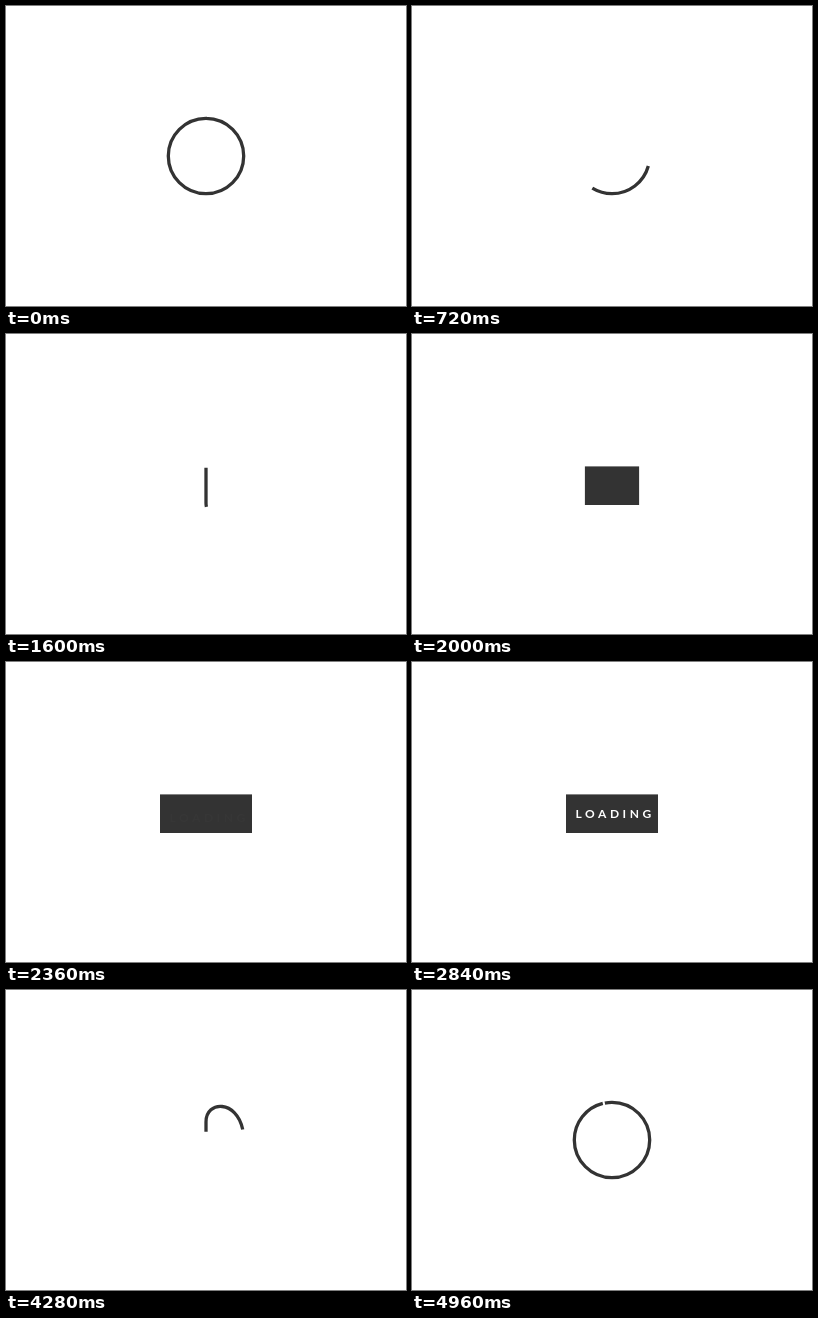
Write an HTML page that moves like this. It is 400 px wide and 300 px high and loops after 5000 ms.

```html
<!DOCTYPE html>
<html lang="en">
<head>
<meta charset="utf-8">
<title>Loading</title>
<style>
  html, body { margin: 0; width: 100%; height: 100%; overflow: hidden; background: #fff; }
  svg { display: block; width: 400px; height: 300px; }
  path { fill: none; stroke: #333; stroke-width: 3.3; }
  rect { fill: #333; }
  text { fill: #fff; font: 700 12px Lato, sans-serif; letter-spacing: 3.6px; }
</style>
</head>
<body>
<svg viewBox="0 0 400 300">
  <path id="enter"/>
  <path id="leave"/>
  <rect id="box" y="132.4" height="38.6"/>
  <text id="label" x="163.4">LOADING</text>
</svg>
<script>
const LOOP = 5000, R = 37.7, DEG = R * Math.PI / 180;
const TOP = 132.4, BOTTOM = 171, LINE = BOTTOM - TOP, STROKE = 3.3;
const [enter, leave, box, label] =
  ['enter', 'leave', 'box', 'label'].map(id => document.getElementById(id));

// Clockwise arcs, relative to the current point.
const arc = (dx, dy) => `a${R} ${R} 0 0 1 ${dx} ${dy}`;
const turn = arc(-2 * R, 0) + arc(2 * R, 0);
const right = 200 + R;

// Circle from the top, off the right side, down and up into the upright line.
enter.setAttribute('d', `M200 ${150 - R}` + arc(R, R) + turn + turn +
  `C${right} 190 200 191 200 169V${TOP}`);
// Up out of the line, over to the right side, then round the circle to the top.
leave.setAttribute('d', `M200 ${BOTTOM}V132C200 108 ${right} 110 ${right} 150` +
  turn + arc(-2 * R, 0) + arc(R, -R));

const end = enter.getTotalLength();
const join = leave.getTotalLength() - 630 * DEG;

// Smooth monotone curve through [time, value] points.
function track(...keys) {
  const secant = i => (keys[i + 1][1] - keys[i][1]) / (keys[i + 1][0] - keys[i][0]);
  const slopes = keys.map((_, i) => {
    if (i === 0 || i === keys.length - 1) return 0;
    const a = secant(i - 1), b = secant(i);
    return a * b > 0 ? 2 * a * b / (a + b) : 0;
  });
  return t => {
    if (t <= keys[0][0]) return keys[0][1];
    const i = keys.findIndex(k => k[0] > t) - 1;
    if (i < 0) return keys[keys.length - 1][1];
    const [t0, v0] = keys[i], [t1, v1] = keys[i + 1];
    const d = t1 - t0, u = (t - t0) / d, w = 1 - u;
    return v0 * w * w * (1 + 2 * u) + v1 * u * u * (3 - 2 * u) +
      d * u * w * (slopes[i] * w - slopes[i + 1] * u);
  };
}

const enterTail = track([120, 0], [720, 464 * DEG], [1200, 783 * DEG],
  [1600, end - LINE - 3], [1760, end - LINE]);
const enterHead = track([120, 361 * DEG], [720, 570 * DEG], [1200, 874 * DEG],
  [1600, end - 2.6], [1760, end]);
const leaveTail = track([4050, 0], [4280, 29], [4800, join + 218 * DEG],
  [4960, join + 258 * DEG], [5000, join + 270 * DEG]);
const leaveHead = track([4050, LINE], [4280, join - 11], [4800, join + 567 * DEG],
  [4960, join + 614 * DEG], [5000, join + 630 * DEG]);
const width = track([1765, STROKE], [2000, 54], [2200, 96], [2340, 92],
  [3700, 92], [3800, 94.5], [4050, STROKE]);
const fade = track([2330, 0], [2840, 1], [3690, 1], [3850, 0]);
const rise = track([2330, 4], [2780, 0]);

function show(el, visible) {
  el.style.display = visible ? '' : 'none';
}

function trim(path, tail, head) {
  path.style.strokeDasharray = `0 ${tail} ${head - tail} 9999`;
}

function draw(t) {
  show(enter, t < 1765);
  show(box, t >= 1765 && t < 4050);
  show(leave, t >= 4050);
  trim(enter, enterTail(t), enterHead(t));
  trim(leave, leaveTail(t), leaveHead(t));
  const w = width(t);
  box.setAttribute('x', 200 - w / 2);
  box.setAttribute('width', w);
  label.setAttribute('y', 155.7 + rise(t));
  label.style.opacity = fade(t);
}

const start = performance.now();
function tick() {
  draw((performance.now() - start) % LOOP);
  requestAnimationFrame(tick);
}
tick();
</script>
</body>
</html>
```
